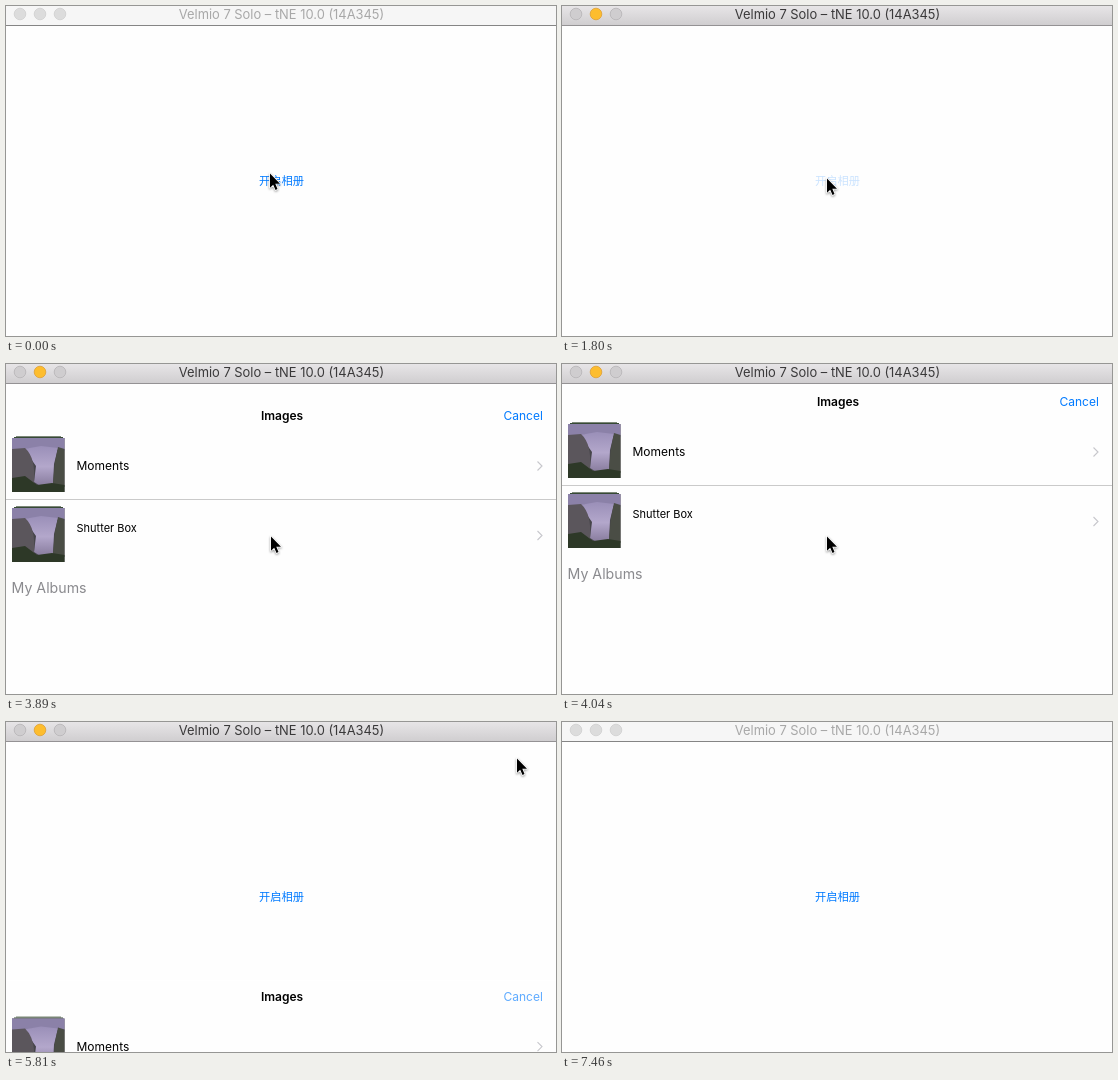
These frames come from a looping animation (550x330 px, 7560 ms). An HTML page:

```html
<!DOCTYPE html>
<html lang="en">
<head>
<meta charset="utf-8">
<style>
html, body { margin: 0; width: 100%; height: 100%; overflow: hidden; background: #fefefe; }
svg { display: block; font-family: Inter, sans-serif; font-size: 12px; }
.mid { text-anchor: middle; }
.blue { fill: #007aff; }
.open { font: 11.25px "Noto Sans CJK SC", "Noto Sans CJK", sans-serif; }
.chevron { fill: none; stroke: #c7c7cc; stroke-width: 1.1; }
#bar { fill: #f6f6f6; }
#edge { fill: #858585; }
#name { font-size: 12.9px; fill: #a8a8a8; }
#lights circle { fill: #dcdcdc; stroke: #d0d0d0; stroke-width: .8; }
.active #bar { fill: url(#metal); }
.active #edge { fill: #949294; }
.active #name { fill: #3a393a; }
.active #lights circle { fill: #cfcdcf; stroke: #b6b4b6; }
.active #lights .amber { fill: #fdbd2e; stroke: #dfa033; }
#cursor { filter: drop-shadow(0 1px .8px #0006); }
</style>
</head>
<body>
<svg id="stage" width="550" height="330" viewBox="0 0 550 330">
  <defs>
    <linearGradient id="metal" x2="0" y2="1">
      <stop stop-color="#e7e5e7"/><stop offset="1" stop-color="#d0ced0"/>
    </linearGradient>
    <linearGradient id="mist" x2="0" y2="1">
      <stop stop-color="#9a8fb8"/><stop offset=".5" stop-color="#b3a7cb"/><stop offset="1" stop-color="#85799a"/>
    </linearGradient>
    <g id="thumb">
      <path d="M4 -2H49V-1H4z" fill="#7c8778"/>
      <path d="M2 -1H51V0H2z" fill="#364a35"/>
      <path d="M0 0H52.5V54H0z" fill="#46454a"/>
      <path d="M0 0H52.5V13L30 9L0 13z" fill="#8b81a8"/>
      <path d="M12 11L29 8L46 10L42 26L41 46L30 49L22 44L24 28z" fill="url(#mist)"/>
      <path d="M0 11L13 10Q24 20 22 45L0 49z" fill="#5b565c"/>
      <path d="M46 9L52.5 11V49L41 45L43 24z" fill="#4a4d45"/>
      <path d="M0 40L13 38L25 47L40 45L52.5 47V54H0z" fill="#2d3827"/>
    </g>
    <path id="chevron" class="chevron" d="M531.5 -4.5L536 0L531.5 4.5"/>
  </defs>

  <rect width="550" height="330" fill="#fefefe"/>
  <text id="open" class="mid blue open" x="275.5" y="179">开启相册</text>

  <g id="sheet">
    <rect y="20" width="550" height="310" fill="#fefefe"/>
    <text class="mid" x="276" y="40.3" font-weight="600">Images</text>
    <text id="cancel" class="blue" x="497.5" y="40.3">Cancel</text>
    <use href="#thumb" x="6" y="58"/>
    <use href="#thumb" x="6" y="128"/>
    <use href="#chevron" y="86"/>
    <use href="#chevron" y="155.5"/>
    <text x="70.5" y="90">Moments</text>
    <text x="70.5" y="152.3" font-size="11">Shutter Box</text>
    <text id="count" x="70.5" y="168" font-size="10.8" fill="#8a8a8a">5</text>
    <text x="5.5" y="213" font-size="14.2" fill="#8a8a8e">My Albums</text>
    <path id="rule" d="M0 119.5H550" stroke="#cacaca"/>
  </g>

  <rect id="bar" width="550" height="19"/>
  <rect id="edge" y="19" width="550" height="1"/>
  <g id="lights">
    <circle cx="14" cy="8" r="5.8"/><circle class="amber" cx="34" cy="8" r="5.8"/><circle cx="54" cy="8" r="5.8"/>
  </g>
  <text id="name" class="mid" x="275.5" y="13">Velmio 7 Solo – tNE 10.0 (14A345)</text>

  <path id="cursor" d="M0 0V14.2L3.2 11.2L5.5 16.4L7.5 15.5L5.3 10.3H10z"
    stroke="#fff" stroke-width="1.6" paint-order="stroke" stroke-linejoin="round"/>
</svg>
<script>
const LOOP = 7560;
const TICK = 148.9; // the screen refreshes once per tick; all motion below is in ticks
const $ = id => document.getElementById(id);

// Smooth 0 to 1, beginning at start and lasting span ticks.
function ease(k, start, span) {
  const u = Math.min(1, Math.max(0, (k - start) / span));
  return u * u * (3 - 2 * u);
}
const between = (k, from, to) => k >= from && k < to;
const move = (id, x, y) => $(id).setAttribute("transform", `translate(${x} ${y})`);
const fade = (id, opacity) => $(id).setAttribute("opacity", opacity);

// A pressed button is dim, then half restored on the tick of its release.
const pressed = (k, down, up) => between(k, down, up) ? .2 : k === up ? .63 : 1;

// Drift down, reach for Cancel, then leave through the bottom in an arc.
function cursorAt(k) {
  const drift = Math.min(1, k / 11);
  const leave = ease(k, 39.6, 3.9);
  return [
    264 + Math.round(drift) + 246 * ease(k, 28, 3.2) - 33 * Math.sin(2.45 * leave),
    167.5 + Math.round(5 * drift) - 136 * ease(k, 28, 4.6) + 303 * leave
  ];
}

// The sheet settles exponentially and later drops away.
function sheetOffset(k) {
  const opening = Math.round(140 * 8.5 ** (25 - k));
  const closing = 322 * ease(k, 38, 1.5);
  return Math.min(322, Math.max(opening, closing));
}

function draw(time) {
  const k = Math.floor(time % LOOP / TICK);
  $("stage").classList.toggle("active", between(k, 12, 50));
  move("cursor", ...cursorAt(k));
  move("sheet", 0, sheetOffset(k));
  fade("open", pressed(k, 12, 24));
  fade("cancel", pressed(k, 37, 39));
  fade("count", ease(k, 28, 2));
  fade("rule", +between(k, 26, 28));
}

let begin;
function tick(now) {
  begin ??= now;
  draw(now - begin);
  requestAnimationFrame(tick);
}
draw(0);
requestAnimationFrame(tick);
</script>
</body>
</html>
```
